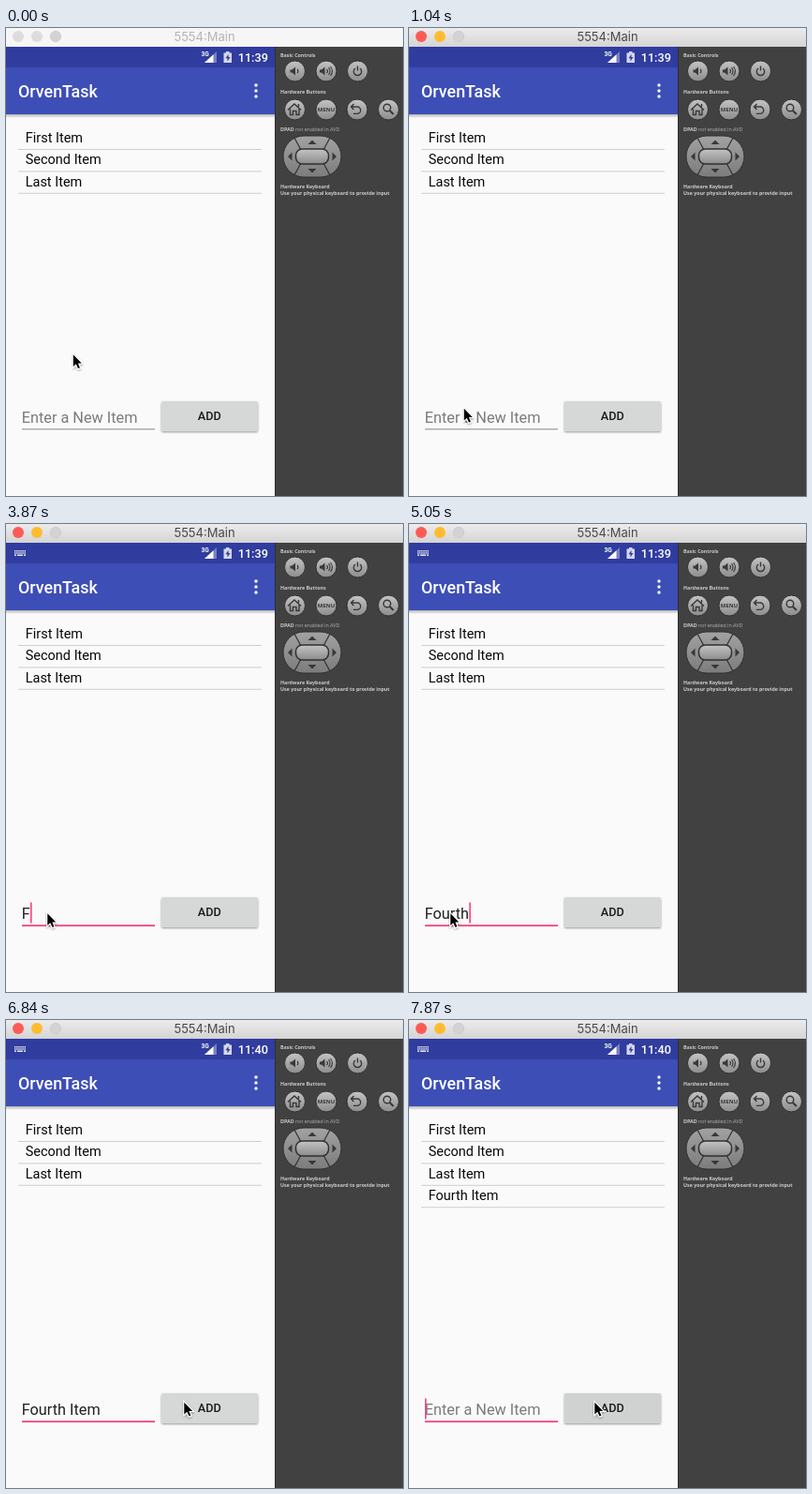
Recreate the animation shown at these times as an HTML page. Size 424 by 499 pixels, loop 8 s.

```html
<!DOCTYPE html>
<html lang="en">
<head>
<meta charset="utf-8">
<title>Todo app demo</title>
<style>
  html, body { margin: 0; width: 100%; height: 100%; overflow: hidden; }
  svg { display: block; }
  text { font-family: Roboto, sans-serif; white-space: pre; }
  .medium { font-weight: 500; }
  .row { font-size: 14.5px; fill: #080808; }
  .field { font-size: 16.3px; }
  .label { font: 700 5.32px "Open Sans", sans-serif; fill: #ccc; }
  .icon { fill: none; stroke: #383838; stroke-width: 1.4; }
  .solid { fill: #383838; }
</style>
</head>
<body>
<svg width="424" height="499" viewBox="0 0 424 499">
  <defs>
    <linearGradient id="chrome" x2="0" y2="1">
      <stop stop-color="#ececec"/><stop offset="1" stop-color="#d4d4d4"/>
    </linearGradient>
    <linearGradient id="metal" x2="0" y2="1">
      <stop stop-color="#c4c4c4"/><stop offset="1" stop-color="#8c8c8c"/>
    </linearGradient>
    <linearGradient id="pad" x2="0" y2="1">
      <stop stop-color="#a2a2a2"/><stop offset="1" stop-color="#7c7c7c"/>
    </linearGradient>
    <linearGradient id="shade" x2="0" y2="1">
      <stop stop-opacity=".28"/><stop offset="1" stop-opacity="0"/>
    </linearGradient>
    <filter id="drop" x="-20%" y="-20%" width="140%" height="150%">
      <feDropShadow dx="0" dy="1" stdDeviation=".9" flood-opacity=".4"/>
    </filter>
  </defs>

  <rect width="424" height="499" fill="#fafafa"/>

  <!-- Window bar -->
  <rect id="bar" width="424" height="20"/>
  <circle id="close" cx="13" cy="9" r="6"/>
  <circle id="minimise" cx="33" cy="9" r="6"/>
  <circle cx="53" cy="9" r="5.7" fill="#d3d3d3" stroke="#c3c3c3" stroke-width=".6"/>
  <text id="caption" x="212" y="14" text-anchor="middle" style="font:13px Inter,sans-serif">5554:Main</text>

  <!-- Status bar and app bar -->
  <rect y="92" width="287" height="4" fill="url(#shade)"/>
  <rect y="20" width="287" height="22" fill="#303c9e"/>
  <rect y="42" width="287" height="50" fill="#3d4eb6"/>
  <g id="keyboard" stroke="#e8eaf6">
    <path d="M9 28.700h12M9 31h12" stroke-width="1.400" stroke-dasharray="1.400 .700"/>
    <path d="M9 33.300h2M12 33.300h6M19 33.300h2" stroke-width="1.400"/>
  </g>
  <g fill="#fff">
    <text x="208.5" y="29.8" font-size="6.6" font-weight="700">3G</text>
    <path d="M225 25V37H212Z" opacity=".35"/>
    <path d="M221.5 28.2V37H212Z"/>
    <path d="M232.5 26.5h2.5v-1.5h3.5v1.5h2.5V37h-8.5Z" opacity=".8"/>
    <path d="M237.5 28l-3 4.2h2v3.2l3-4.3h-2Z" fill="#303c9e"/>
    <text id="clock" class="medium" x="247.7" y="35.8" font-size="12.7"></text>
    <text class="medium" x="13" y="73.5" font-size="17.9">OrvenTask</text>
    <circle cx="267" cy="61" r="1.7"/><circle cx="267" cy="67" r="1.7"/><circle cx="267" cy="73" r="1.7"/>
  </g>

  <g id="list"></g>

  <!-- Entry field and button -->
  <text id="entry" class="field" x="16.7" y="421"></text>
  <rect id="underline" x="17" width="142" y="427.3"/>
  <rect id="caret" y="403.5" width="1.6" height="22" fill="#ff3d7f"/>
  <rect id="button" x="166" y="398" width="103" height="32" rx="1.6" filter="url(#drop)"/>
  <text class="medium" x="217.3" y="418.3" text-anchor="middle" font-size="12.7" fill="#1c1c1c">ADD</text>

  <!-- Emulator controls -->
  <rect x="287" y="20" width="137" height="479" fill="#414141"/>
  <rect x="287" y="20" width="1" height="479" fill="#303030"/>
  <text class="label" x="293" y="30.5">Basic Controls</text>
  <text class="label" x="293" y="69.5">Hardware Buttons</text>
  <text class="label" x="293" y="110">DPAD <tspan font-weight="400" fill="#b4b4b4">not enabled in AVD</tspan></text>
  <text class="label" x="293" y="171">Hardware Keyboard</text>
  <text class="label" x="293" y="177.700">Use your physical keyboard to provide input</text>
  <g id="knobs"></g>
  <g class="icon" transform="translate(-.5 0)">
    <path class="solid" stroke="none" d="M304 44.500h2l3.500-3v9l-3.500-3h-2ZM335.500 44.500h2l3.500-3v9l-3.500-3h-2Z"/>
    <path stroke-width="1.100" d="M311.500 43.800q2 2.200 0 4.400M343 43.800q2 2.200 0 4.400M345 42.200q3 3.800 0 7.600M347 41q4 5 0 10"/>
    <path d="M373.500 43a4.200 4.200 0 1 0 5 0M376 40.500v5"/>
    <path d="M301.500 87.500l7-6.500 7 6.500M304 86.500v6h3v-4h3.500v4h3v-6M313 81v3"/>
    <path d="M372 81l-3 3 3 3M369.500 84h6a3.700 3.700 0 0 1 0 7.400h-4"/>
    <circle cx="407.500" cy="85" r="3.800"/><path stroke-width="2" d="M410.300 88l4 4"/>
  </g>
  <text x="342" y="89.300" text-anchor="middle" style="font:700 6px 'Open Sans',sans-serif" fill="#383838">MENU</text>
  <g stroke="#303030">
    <rect x="296" y="115" width="62" height="44" rx="22" fill="url(#pad)"/>
    <path d="M308 117l7 13M346 117l-7 13M308 157l7-13M346 157l-7-13" stroke-width="1.200"/>
    <rect x="309.500" y="129" width="35" height="16" rx="7" fill="url(#metal)" stroke-width="1.500"/>
    <path class="solid" stroke="none" d="M322.500 124h9l-4.500-4.500ZM322.500 150h9l-4.500 4.500ZM305.500 132.500v9l-4.500-4.500ZM348.500 132.500v9l4.500-4.500Z"/>
  </g>

  <path id="pointer" d="M.8 .8V13.600L3.800 10.800 6 15.600 7.900 14.800 5.900 10H9.800Z"
        fill="#000" stroke="#fff" stroke-width="2.200" paint-order="stroke" filter="url(#drop)"/>
</svg>
<script>
const LOOP = 8000;
const $ = id => document.getElementById(id);

// Each track lists [start time, value]; values hold until the next entry.
const tracks = {
  pointer: [[0, [71, 347.5]], [450, [70, 366]], [600, [68, 410]], [740, [65, 433]], [890, [61, 421]],
    [1040, [58, 405]], [1340, [48, 411]], [1490, [36, 414.5]], [1790, [41, 414.5]], [1940, [43.5, 414.5]],
    [6690, [125, 412]], [6840, [189.5, 407]], [6990, [194, 407]], [7130, [197.5, 407]]],
  active: [[0, false], [740, true]],
  focused: [[0, false], [1790, true]],
  keyboard: [[0, false], [1940, true]],
  caret: [[0, false], [1790, true], [2230, false], [2830, true], [3270, false], [3870, true],
    [6690, false], [7280, true]],
  text: [[0, ''], [3870, 'F'], [4160, 'Fo'], [4310, 'Fou'], [4460, 'Four'], [4910, 'Fourt'], [5050, 'Fourth'],
    [5500, 'Fourth '], [5650, 'Fourth I'], [5940, 'Fourth It'], [6090, 'Fourth Ite'], [6240, 'Fourth Item'],
    [7730, '']],
  clock: [[0, '11:39'], [5500, '11:40']],
  button: [[0, '#d6d7d7'], [7580, '#c8caca'], [7730, '#cccece'], [7870, '#d0d2d1']],
  added: [[0, false], [7730, true]],
};
const at = (name, t) => tracks[name].findLast(([start]) => start <= t)[1];
const show = (id, on) => $(id).setAttribute('visibility', on ? 'visible' : 'hidden');
const set = (id, attrs) => {
  for (const key in attrs) $(id).setAttribute(key, attrs[key]);
};

$('list').innerHTML = ['First Item', 'Second Item', 'Last Item', 'Fourth Item'].map((item, i) =>
  `<g id="item${i}"><text class="row" x="20.7" y="${122 + i * 23.4}">${item}</text>
   <rect x="13" y="${129 + i * 23.4}" width="260" height="1" fill="#d0d0d0"/></g>`).join('');

$('knobs').innerHTML = [[308.5, 46], [342, 46], [375.5, 46], [308.5, 87], [342, 87], [375, 87], [408.5, 87]]
  .map(([x, y]) => `<circle cx="${x}" cy="${y}" r="11" fill="url(#metal)" stroke="#303030"/>`)
  .join('');

function draw(t) {
  const active = at('active', t), focused = at('focused', t), text = at('text', t);

  set('bar', { fill: active ? 'url(#chrome)' : '#f6f6f6' });
  set('close', { fill: active ? '#fc5b57' : '#dcdcdc' });
  set('minimise', { fill: active ? '#fdbc30' : '#dcdcdc' });
  set('caption', { fill: active ? '#484848' : '#b4b4b4' });

  show('keyboard', at('keyboard', t));
  $('clock').textContent = at('clock', t);
  show('item3', at('added', t));

  $('entry').textContent = text || 'Enter a New Item';
  set('entry', { fill: text ? '#212121' : '#7b7b7b' });
  set('underline', focused ? { height: 1.8, fill: '#f5407f' } : { height: 1, fill: '#858585' });
  set('caret', { x: 17 + (text ? $('entry').getComputedTextLength() : 0) });
  show('caret', at('caret', t));
  set('button', { fill: at('button', t) });
  set('pointer', { transform: `translate(${at('pointer', t)})` });
}

const begin = performance.now();
function tick() {
  draw((performance.now() - begin) % LOOP);
  requestAnimationFrame(tick);
}
tick();
</script>
</body>
</html>
```
